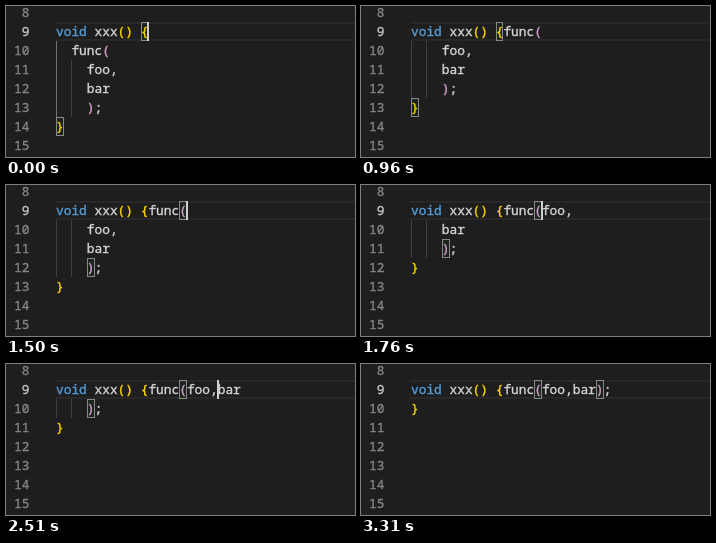
Animation, 349 px wide and 151 px high, one loop 3640 ms. Source, as an HTML page with a canvas:

```html
<!DOCTYPE html>
<html lang="en">
<head>
<meta charset="utf-8">
<title>Joining lines in an editor</title>
<style>
  html, body { margin: 0; width: 349px; height: 151px; overflow: hidden; background: #1e1e1e; }
  canvas { display: block; }
</style>
</head>
<body>
<canvas id="stage" width="349" height="151"></canvas>
<script>
const ctx = document.getElementById('stage').getContext('2d');
const LOOP = 3640, LINE = 19, ADVANCE = 7.7, LEFT = 50, FIRST = 8, ACTIVE = 9;

const colX = col => LEFT + col * ADVANCE;
const rowY = line => (line - FIRST) * LINE - 3;
const indentOf = row => row.search(/\S/);

// Code starting on the active line, one version per join.
const texts = [
  ['void xxx() {', '  func(', '    foo,', '    bar', '    );', '}'],
  ['void xxx() {func(', '    foo,', '    bar', '    );', '}'],
  ['void xxx() {func(foo,', '    bar', '    );', '}'],
  ['void xxx() {func(foo,bar', '    );', '}'],
  ['void xxx() {func(foo,bar);', '}']
];

// [start ms, text version, caret column or -1, outer bracket pair marked]
const steps = [
  [0, 0, 12, true],
  [500, 0, -1, true],
  [960, 1, -1, true],
  [1030, 1, 12, true],
  [1430, 1, -1, true],
  [1500, 1, 17, false],
  [1760, 2, 17, false],
  [1960, 2, -1, false],
  [2160, 2, 21, false],
  [2510, 3, 21, false],
  [2640, 3, -1, false],
  [2840, 3, 24, false],
  [3040, 4, 24, false],
  [3310, 4, -1, false]
];

function rect(color, x, y, w, h) {
  ctx.fillStyle = color;
  ctx.fillRect(x, y, w, h);
}

// Characters are placed one by one to keep the column grid exact;
// a hairline outline gives them the weight of screen-hinted type.
function write(text, x, line, color) {
  ctx.fillStyle = ctx.strokeStyle = color;
  ctx.lineWidth = .35;
  [...text].forEach((ch, i) => {
    const spot = [ch, x + i * ADVANCE, rowY(line) + 14];
    ctx.fillText(...spot);
    ctx.strokeText(...spot);
  });
}

function markBracket(line, col) {
  const x = Math.round(colX(col)), w = Math.round(colX(col + 1)) - x, y = rowY(line);
  rect('rgba(0,100,0,.1)', x, y, w, LINE);
  ctx.strokeStyle = '#888';
  ctx.lineWidth = 1;
  ctx.strokeRect(x + .5, y + .5, w - 1, LINE - 1);
}

// The outer guide lights up while the body sits one level in.
function drawGuides(rows) {
  const lit = indentOf(rows[1]) === 2;
  rows.forEach((row, i) => {
    for (let col = 0; col < indentOf(row); col += 2)
      rect(lit && col === 0 ? '#707070' : '#404040', Math.round(colX(col)), rowY(ACTIVE + i), 1, LINE);
  });
}

function drawCode(rows) {
  let depth = 0;
  rows.forEach((row, i) => {
    [...row].forEach((ch, col) => {
      if (')}'.includes(ch)) depth--;
      const bracket = '(){}'.includes(ch) && (depth ? '#d79fd4' : '#ffd700');
      const plain = i === 0 && col < 4 ? '#569cd6' : '#d4d4d4';
      write(ch, colX(col), ACTIVE + i, bracket || plain);
      if ('({'.includes(ch)) depth++;
    });
  });
}

function markPair(rows, outer) {
  const [open, close] = outer ? '{}' : ['func(', ');'];
  const end = rows.findIndex(row => row.includes(close));
  markBracket(ACTIVE, rows[0].indexOf(open) + open.length - 1);
  markBracket(ACTIVE + end, rows[end].indexOf(close));
}

function draw(time) {
  const [, version, caret, outer] = steps.findLast(step => step[0] <= time);
  const rows = texts[version];
  rect('#1e1e1e', 0, 0, 349, 151);
  ctx.font = '12.83px "Noto Sans Mono", "DejaVu Sans Mono", monospace';
  const top = rowY(ACTIVE);
  rect('#282828', 49, top, 300, 2);
  rect('#282828', 49, top + LINE - 2, 300, 2);
  for (let line = FIRST; line <= 15; line++) {
    const label = String(line);
    write(label, 23.4 - label.length * ADVANCE, line, line === ACTIVE ? '#c6c6c6' : '#858585');
  }
  drawGuides(rows);
  markPair(rows, outer);
  drawCode(rows);
  if (caret >= 0) rect('#d0d0d0', Math.round(colX(caret) - 1), top, 2, LINE);
}

function tick() {
  draw((performance.now() - start) % LOOP);
  requestAnimationFrame(tick);
}
const start = performance.now();
tick();
</script>
</body>
</html>
```
